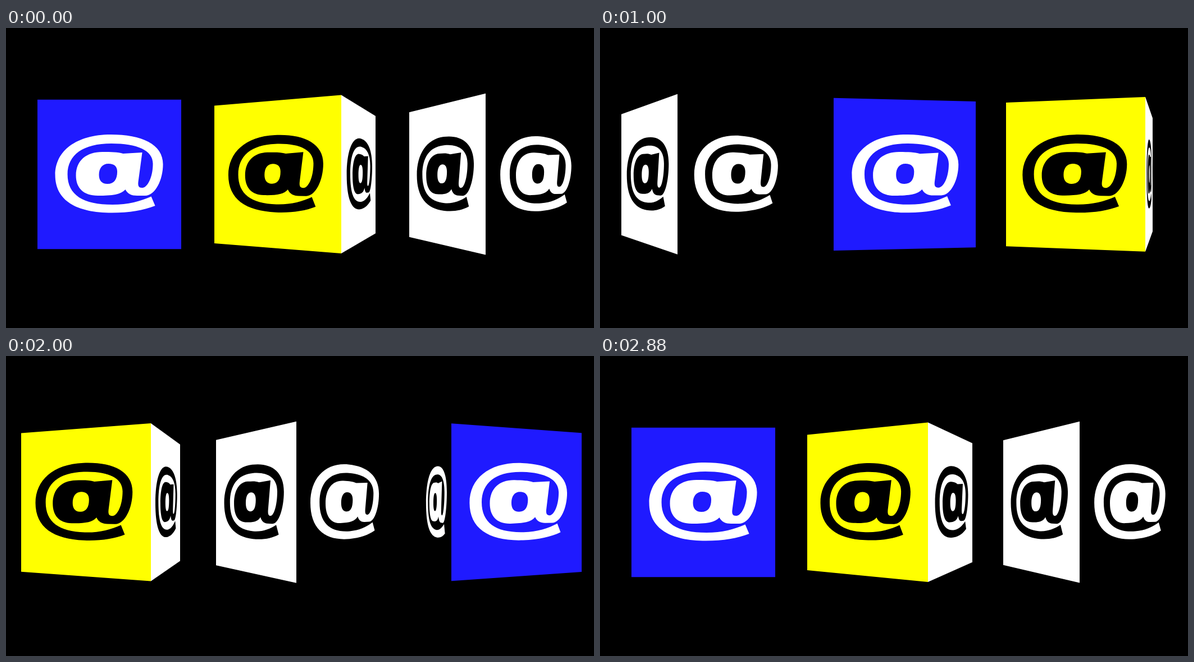
An HTML page with a canvas for the animation above (2.92 s loop, 1047 by 535 pixels).

```html
<!DOCTYPE html>
<html lang="en">
<head>
<meta charset="utf-8">
<title>Turning @ cubes</title>
<style>
  html, body { margin: 0; width: 100%; height: 100%; overflow: hidden; background: #000; }
  canvas { display: block; }
</style>
</head>
<body>
<canvas id="stage" width="1047" height="535" role="img" aria-label="@ @ @"></canvas>
<script>
const ctx = document.getElementById('stage').getContext('2d');

const STEP = 40, STEPS = 73;
const DIST = 6.55;             // eye distance, in half sides of a cube
const ZOOM_X = 710.4, ZOOM_Y = 1479 / 2;
const HALF_W = 128, HALF_H = 133.25;

// Faces from left to right around a cube: [fill, ink]
const FACES = [
  ['#1f1aff', '#fff'],
  ['#ff0', '#000'],
  ['#fff', '#000'],
  ['#000', '#fff']
];

// Each cube: centre and [step, degrees] knots of its turn
const CUBES = [
  { x: 181.6, turn: [[0, 0], [0.8, 0], [72, 360], [73, 360]] },
  { x: 527, turn: [[0, 246.7], [14, 319], [22.1, 360], [23.6, 360], [25, 367.2], [72, 602.5], [73, 606.7]] },
  { x: 869.6, turn: [[0, 130.8], [33, 299], [44, 350.7], [72, 490.8], [73, 490.8]] }
];

// The at sign, in pixels from the middle of a front-on face
const SIGN = `
  M64 38 C82 38 96 10 96 -18 C96 -54 58 -71 3 -71 C-58 -71 -96 -42 -96 1
  C-96 47 -58 68.5 5 68.5 C36 68.5 62 64 82 56 L75 39.5
  C56 48 34 54 6 54 C-46 54 -74 37 -74 0 C-74 -35 -46 -55 4 -55
  C50 -55 78 -43 78 -19 C78 6 68 24 59 24 C53 24 51 21 52 13
  L59 -39 L25 -37 C15 -39.8 4 -40 -12 -40 C-40 -40 -59 -25 -59 2
  C-59 24 -46 38 -20 38 C6 38 21 36 29 27 C33 35 40 38 50 38 Z
  M-1 -19 C9 -19 14.5 -14 14.5 -5 C14.5 9 9 17 -3 17
  C-13 17 -18 11 -18 1 C-18 -11 -12 -19 -1 -19 Z`
  .match(/[MLCZ][^MLCZ]*/g)
  .map(s => [s[0], (s.slice(1).match(/-?[\d.]+/g) || []).map(Number)]);

const METHOD = { M: 'moveTo', L: 'lineTo', C: 'bezierCurveTo', Z: 'closePath' };

const rad = deg => deg * Math.PI / 180;

function angleAt(turn, n) {
  const i = Math.max(1, turn.findIndex(k => k[0] >= n));
  const [n0, a0] = turn[i - 1], [n1, a1] = turn[i];
  return a0 + (a1 - a0) * (n - n0) / (n1 - n0);
}

// Maps face coordinates (-1 to 1) to the stage
function projector(cx, angle) {
  const s = Math.sin(angle), c = Math.cos(angle);
  return (u, v) => {
    const k = 1 / (DIST - c + u * s);
    return [cx + ZOOM_X * (s + u * c) * k, 264.2 - 18 * k + ZOOM_Y * v * k];
  };
}

function drawFace(project, [fill, ink]) {
  ctx.fillStyle = fill;
  ctx.beginPath();
  for (const [u, v] of [[-1, -1], [1, -1], [1, 1], [-1, 1]]) {
    const [x, y] = project(u, v);
    ctx.lineTo(Math.round(x), y);
  }
  ctx.fill();

  ctx.fillStyle = ink;
  ctx.beginPath();
  for (const [op, nums] of SIGN) {
    const args = [];
    for (let i = 0; i < nums.length; i += 2)
      args.push(...project(nums[i] / HALF_W, nums[i + 1] / HALF_H));
    ctx[METHOD[op]](...args);
  }
  ctx.fill('evenodd');
}

function drawCube({ x, turn }, n) {
  const deg = angleAt(turn, n);
  const cx = x + 2 * Math.cos(rad(deg - 12));   // axis sits slightly off centre
  FACES.forEach((face, i) => {
    const angle = rad(deg + 90 * i);
    if (DIST * Math.cos(angle) > 1) drawFace(projector(cx, angle), face);
  });
}

function frame(now) {
  const n = Math.floor(Math.max(0, now) / STEP) % STEPS;
  ctx.fillStyle = '#000';
  ctx.fillRect(0, 0, 1047, 535);
  for (const cube of CUBES) drawCube(cube, n);
  requestAnimationFrame(frame);
}
requestAnimationFrame(frame);
</script>
</body>
</html>
```
